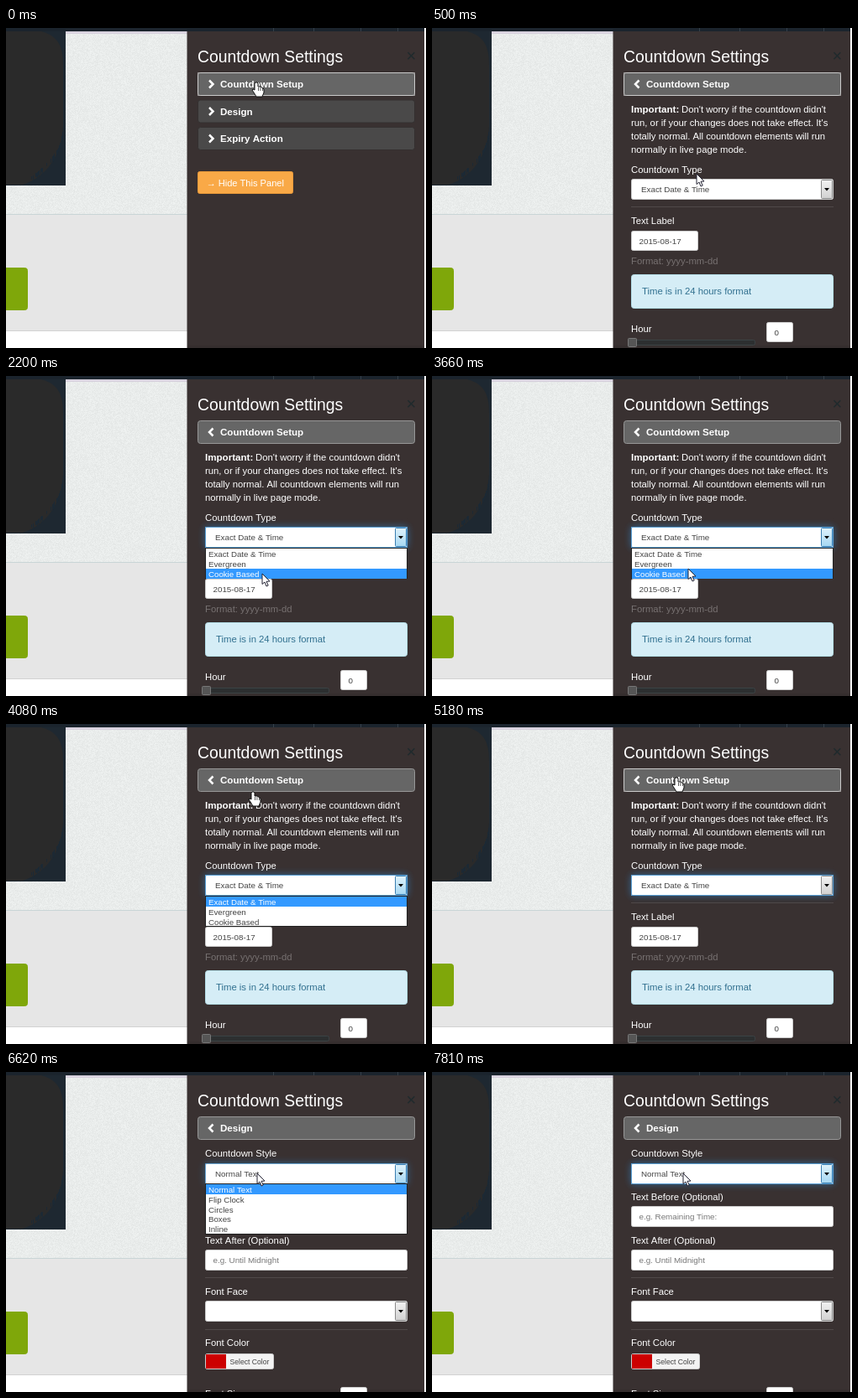
These frames come from a looping animation (500x382 px, 8 s). An HTML page with a canvas:

```html
<!DOCTYPE html>
<html lang="en">
<head>
<meta charset="utf-8">
<title>Countdown settings</title>
<style>
html, body { margin: 0; width: 100%; height: 100%; overflow: hidden; background: #fff; }
canvas { display: block; }
</style>
</head>
<body>
<canvas id="stage" width="500" height="382"></canvas>
<script>
const LOOP = 8000;
const ROW = 11.75;
const stage = document.getElementById('stage');
let c = stage.getContext('2d');

const clamp = (v, lo, hi) => Math.min(hi, Math.max(lo, v));
const ramp = (t, a, b) => clamp((t - a) / (b - a), 0, 1);

// Pointer hot spot: time, x, y
const path = [
  [260, 298, 65], [500, 315, 174], [620, 315, 189], [1300, 315, 189],
  [1720, 308, 225], [1920, 308, 225], [2200, 305, 236], [3645, 305, 236],
  [4080, 294, 81], [4290, 291, 64], [5500, 291, 64], [5680, 292, 98],
  [6039, 292, 98], [6040, 299, 121]
];

function pointerAt(t) {
  const i = path.findIndex(p => p[0] > t);
  if (i === 0) return path[0].slice(1);
  if (i < 0) return path[path.length - 1].slice(1);
  const [a, b] = [path[i - 1], path[i]];
  const k = ramp(t, a[0], b[0]);
  return [a[1] + (b[1] - a[1]) * k, a[2] + (b[2] - a[2]) * k];
}

function rect(x, y, w, h, fill) {
  c.fillStyle = fill;
  c.fillRect(x, y, w, h);
}

function box(x, y, w, h, r, fill, stroke = fill) {
  c.beginPath();
  c.roundRect(x + .5, y + .5, w - 1, h - 1, r);
  c.fillStyle = fill;
  c.fill();
  c.strokeStyle = stroke;
  c.lineWidth = 1;
  c.stroke();
}

function text(s, x, y, size = 11.3, color = '#fff', weight = '') {
  c.font = `${weight} ${size}px "Liberation Sans", Arial, sans-serif`;
  c.fillStyle = color;
  c.fillText(s, x, y);
}

function shape(points, fill, stroke, width = 1) {
  c.beginPath();
  points.forEach(([x, y]) => c.lineTo(x, y));
  if (fill) {
    c.closePath();
    c.fillStyle = fill;
    c.fill();
  }
  if (stroke) {
    c.strokeStyle = stroke;
    c.lineWidth = width;
    c.stroke();
  }
}

function drawPage() {
  let seed = 7;
  const rnd = () => (seed = seed * 16807 % 2147483647) / 2147483647;
  rect(0, 0, 500, 382, '#fff');
  for (let y = 4; y < 222; y++) {
    for (let x = 0; x < 216; x++) {
      const v = 229 + Math.round(rnd() * 12);
      rect(x, y, 1, 1, `rgb(${v - 2},${v + 1},${v})`);
    }
  }
  rect(71, 4, 145, 3, '#d9d3df');
  rect(0, 222, 216, 139, '#e6e6e6');
  rect(0, 222, 216, 1, '#c9d5d6');
  rect(0, 361, 216, 1, '#d2d2d2');

  // Dark picture: a rounded face on navy with a ragged lower edge
  rect(0, 4, 71, 184, '#1e2831');
  c.beginPath();
  c.moveTo(0, 4);
  c.lineTo(42, 4);
  c.bezierCurveTo(64, 10, 68, 24, 68, 46);
  c.lineTo(68, 118);
  c.bezierCurveTo(66, 152, 48, 178, 20, 187);
  c.lineTo(0, 187);
  c.fillStyle = '#2a2a2a';
  c.fill();
  for (let i = 0; i < 32; i++) {
    const k = rnd();
    rect(Math.round(67 - 38 * k * k), Math.round(122 + 56 * k), 1, 3 + rnd() * 5, '#1c2934');
  }
  box(-6, 286, 32, 51, 3, '#7fa70a');

  rect(215.5, 0, 282.5, 382, '#393131');
  rect(216, 379, 282, 3, '#352e2e');
  rect(0, 0, 498, 4, '#1b242d');
  [318, 366, 422, 466].forEach(x => rect(x, 0, 1, 4, '#35404a'));
  text('Countdown Settings', 228, 41, 19.35);
  text('×', 476.5, 40, 20, '#1f2a2d');
}

function header(label, y, { light = 0, focus = false, open = false } = {}) {
  box(228, y, 259, 28, 3, '#4a4949', '#343030');
  c.globalAlpha = light;
  box(228, y, 259, 28, 3, '#666', '#979797');
  c.globalAlpha = 1;
  if (focus) {
    c.setLineDash([1, 1]);
    c.strokeStyle = '#fff';
    c.strokeRect(228.5, y + .5, 258, 27);
    c.setLineDash([]);
  }
  const [tip, end] = open ? [242, 246.5] : [246.5, 242];
  shape([[end, y + 9.5], [tip, y + 14], [end, y + 18.5]], null, '#fff', 2.5);
  text(label, 255, y + 18, 11.6, '#fff', 'bold');
}

function field(y, s, color = '#555', x = 237, w = 241, h = 25, pad = 9.5) {
  box(x, y, w, h, 2, '#fff', '#ccc');
  text(s, x + pad, y + h / 2 + 3.5, 9.8, color);
}

function select(y, s, glow = 0, hot = false) {
  if (glow) {
    c.save();
    c.globalAlpha = glow;
    c.shadowColor = 'rgba(50,120,175,.7)';
    c.shadowBlur = 9;
    box(237, y, 241, 25, 2, '#fff');
    c.restore();
  }
  field(y, s, '#444', 237, 241, 25, 12);
  if (glow) {
    c.globalAlpha = glow;
    c.strokeStyle = '#5a9fd4';
    c.strokeRect(237.5, y + .5, 240, 24);
    c.globalAlpha = 1;
  }
  const g = c.createLinearGradient(0, y, 0, y + 25);
  g.addColorStop(0, hot ? '#e3f4fc' : '#f4f4f4');
  g.addColorStop(1, hot ? '#a2d6f2' : '#cfcfcf');
  box(463, y + 1, 14, 23, 1, g, hot ? '#3c7fb1' : '#8a8a8a');
  shape([[467, y + 11], [473, y + 11], [470, y + 14.5]], '#000');
}

function list(y, items, pick) {
  const h = Math.round(items.length * ROW);
  rect(237, y, 241, h + 2, '#222');
  rect(238, y + 1, 239, h, '#fff');
  items.forEach((s, i) => {
    const top = Math.round(y + 1 + i * ROW);
    if (i === pick) rect(238, top, 239, 12, '#3399ff');
    text(s, 241, top + 9.5, 9.7, i === pick ? '#fff' : '#444');
  });
}

const rule = y => rect(237, y, 241, 1, '#504949');

function menu(t) {
  const setup = t < 5910;
  header('Countdown Setup', 53, { light: +setup, focus: setup });
  header('Design', 85.5, { light: ramp(t, 5530, 5680), focus: !setup });
  header('Expiry Action', 118);
  box(228, 171, 114, 27, 2, '#f9a947', '#e8993a');
  text('→ Hide This Panel', 238.5, 188.5, 11.1);
}

function setupPanel(t, y) {
  header('Countdown Setup', 53, { light: 1, open: true, focus: t < 950 || t >= 5180 });
  text('Important:', 237, 101, 11.6, '#fff', 'bold');
  text("Don't worry if the countdown didn't", 297, 101);
  text("run, or if your changes does not take effect. It's", 237, 117);
  text('totally normal. All countdown elements will run', 237, 133);
  text('normally in live page mode.', 237, 149);
  text('Countdown Type', 237, 173);
  rule(213);
  select(180, 'Exact Date & Time', ramp(t, 920, 1100), t >= 950 && t < 5180);
  text('Text Label', 237, 234);
  field(242, '2015-08-17', '#444', 237, 80, 24);
  text('Format: yyyy-mm-dd', 237, 282, 11.3, '#777171');
  box(237, 294, 241, 41, 3, '#d5edf6', '#b5dfe8');
  text('Time is in 24 hours format', 250, 318, 11.3, '#31708f');
  text('Hour', 237, 363);
  box(233, 372, 152, 7, 2, '#2c2f30', '#3b4345');
  box(233, 370, 11, 11, 1, '#555', '#777');
  field(351, '0', '#444', 398, 32, 24);
  if (t >= 980 && t < 4450) {
    const pick = clamp(Math.floor((y - 206) / ROW), 0, 2);
    list(205, ['Exact Date & Time', 'Evergreen', 'Cookie Based'], pick);
  }
}

function designPanel(t) {
  header('Design', 53, { light: 1, open: true, focus: t < 6500 });
  text('Countdown Style', 237, 101);
  select(109, 'Normal Text', ramp(t, 6470, 6650), t >= 6500);
  text('Text Before (Optional)', 237, 153);
  field(160, 'e.g. Remaining Time:', '#777');
  text('Text After (Optional)', 237, 205);
  field(212, 'e.g. Until Midnight', '#777');
  rule(245);
  text('Font Face', 237, 266);
  select(273, '');
  rule(307);
  text('Font Color', 237, 327);
  box(237, 336, 82, 19, 2, '#f3f3f3', '#ccc');
  rect(238, 337, 24, 17, '#c00');
  text('Select Color', 266.5, 349, 8.6, '#444');
  text('Font Size', 237, 388);
  field(376, '', '#444', 398, 32, 24);
  if (t >= 6530 && t < 7810) {
    list(133, ['Normal Text', 'Flip Clock', 'Circles', 'Boxes', 'Inline'], 0);
  }
}

function pointer(x, y, hand) {
  c.save();
  c.translate(Math.round(x), Math.round(y));
  c.lineJoin = 'round';
  if (hand) {
    shape([[-1, 0], [1, 0], [2, 1], [2, 5], [5, 5], [8, 7], [9, 8], [9, 12], [7, 17],
      [0, 17], [-3, 12], [-5, 9], [-4, 8], [-2, 9], [-2, 1]], '#fff', '#111');
    [2, 4.5, 7].forEach(k => rect(k, 6, .8, 4, '#333'));
  } else {
    shape([[0, 0], [0, 12.5], [3, 10], [5, 15], [7.2, 14], [5, 9.3], [9, 9]], '#fff', '#223');
  }
  c.restore();
}

const page = document.createElement('canvas');
page.width = 500;
page.height = 382;
const screen = c;
c = page.getContext('2d');
drawPage();
c = screen;

function frame(now) {
  const t = now % LOOP;
  const [x, y] = pointerAt(t);
  const closed = t < 60 || (t >= 5210 && t < 6040);
  c.drawImage(page, 0, 0);
  if (closed) menu(t);
  else if (t < 5210) setupPanel(t, y);
  else designPanel(t);
  pointer(x, y, closed || y < 84);
  requestAnimationFrame(frame);
}
requestAnimationFrame(frame);
</script>
</body>
</html>
```
